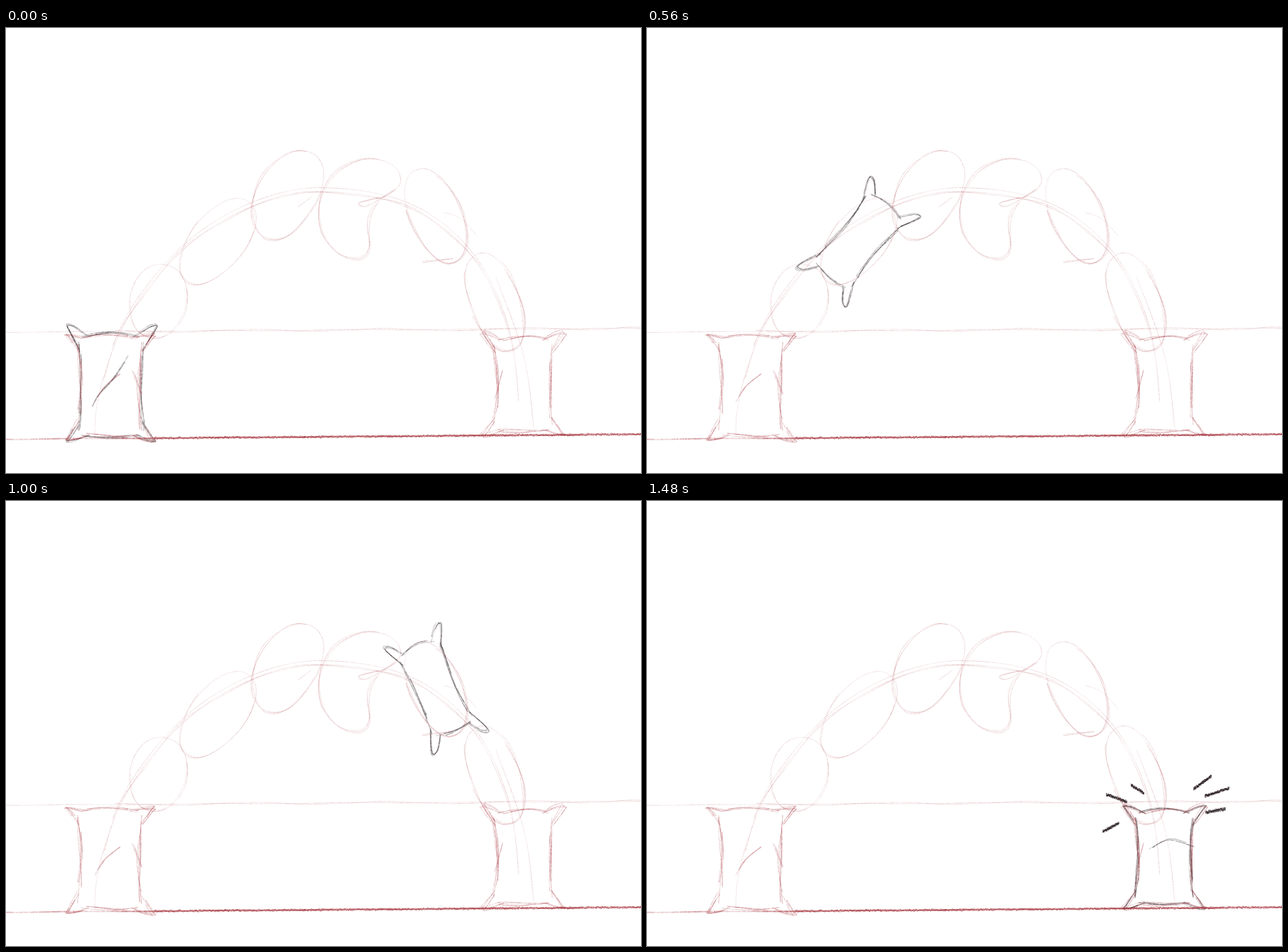
Recreate the animation shown at these times as an HTML page with a canvas. Size 894 by 626 pixels, loop 1600 ms.

```html
<!DOCTYPE html>
<html lang="en">
<head>
<meta charset="utf-8">
<title>Flour sack jump</title>
<style>
html, body { margin: 0; width: 100%; height: 100%; overflow: hidden; background: #fff; }
canvas { display: block; width: 894px; height: 626px; }
</style>
</head>
<body>
<canvas id="stage" width="894" height="626"></canvas>
<script>
const W = 894, H = 626, LOOP = 1600;
const RED = '168,58,66', INK = '40,28,32';

let seed = 1;
const rnd = (lo = 0, hi = 1) => {
  seed = (seed * 1664525 + 1013904223) >>> 0;
  return lo + (hi - lo) * seed / 4294967296;
};
const range = (n, f) => Array.from({ length: n + 1 }, (_, i) => f(i / n));

function sheet(paint, s) {
  const c = document.createElement('canvas');
  c.width = W;
  c.height = H;
  seed = s;
  paint(c.getContext('2d'));
  return c;
}

// Catmull-Rom samples, about two pixels apart
function curve(pts) {
  const at = i => pts[Math.max(0, Math.min(pts.length - 1, i))];
  const out = [pts[0]];
  for (let i = 0; i < pts.length - 1; i++) {
    const q = [-1, 0, 1, 2].map(k => at(i + k));
    const n = Math.ceil(Math.hypot(q[2][0] - q[1][0], q[2][1] - q[1][1]) / 2) || 1;
    for (let j = 1; j <= n; j++) {
      const t = j / n;
      out.push([0, 1].map(k => {
        const [a, b, c, d] = q.map(p => p[k]);
        return b + t / 2 * (c - a + t * (2 * a - 5 * b + 4 * c - d + t * (3 * (b - c) + d - a)));
      }));
    }
  }
  return out;
}

// Pencil: overlapping partial passes with wobble and uneven pressure
const pencil = (g, color, alpha, wobble = 1.8, width = 1.1) => (passes, ...points) => {
  const pts = curve(points);
  g.lineWidth = width;
  for (let p = 0; p < passes; p++) {
    const ax = rnd(0, 7), ay = rnd(0, 7), amp = p ? wobble : 0.4;
    const spot = i => [pts[i][0] + amp * Math.sin(ax + i / 11), pts[i][1] + amp * Math.sin(ay + i / 14)];
    const first = p ? Math.floor(pts.length * rnd(0, 0.25)) : 0;
    const last = p ? pts.length * rnd(0.75, 1) : pts.length;
    for (let i = first + 1; i < last; i++) {
      g.strokeStyle = `rgba(${color},${alpha * (0.75 + 0.25 * Math.sin(ax + i / 9)) * rnd(0.4, 1)})`;
      g.beginPath();
      g.moveTo(...spot(i - 1));
      g.lineTo(...spot(i));
      g.stroke();
    }
  }
};

// Grainy crayon bar
function crayon(g, color, thick, x1, y1, x2, y2) {
  const n = Math.hypot(x2 - x1, y2 - y1) * thick * 1.7;
  for (let i = 0; i < n; i++) {
    const t = i / n, off = (rnd() + rnd() - 1) * thick;
    g.fillStyle = `rgba(${color},${rnd(0.1, 0.7)})`;
    g.fillRect(x1 + (x2 - x1) * t, y1 + (y2 - y1) * t + off - 0.6, 1.3, 1.2);
  }
}

const pose = (x, y, w, h, turn = 0, bend = 0, more) =>
  ({ x, y, w, h, turn, bend, spread: 12, up: 20, down: 22, ...more });

// Maps body coordinates onto the stage: bend along an arc, then turn
const placer = ({ x, y, h, turn, bend }) => (u, v) => {
  const k = (bend || 0.001) / (h / 2), r = 1 / k, a = turn * Math.PI / 180;
  const px = r - (r - u) * Math.cos(k * v), py = (r - u) * Math.sin(k * v);
  return [x + px * Math.cos(a) - py * Math.sin(a), y + px * Math.sin(a) + py * Math.cos(a)];
};

function sack(p, s, heavy = 4) {
  const put = placer(s), a = s.w / 2, b = s.h / 2, ear = s.w * 0.17;
  for (const side of [-1, 1]) {
    p(heavy, ...range(4, t => put(side * (a - 4 * Math.sin(Math.PI * t)), (2 * t - 1) * (b - 6))));
    const rise = side < 0 ? 6 : 3;
    p(3, ...range(4, t => put((2 * t - 1) * (a - 5), side * (b + rise * Math.sin(Math.PI * t)))));
    for (const end of [-1, 1]) {
      const tip = end < 0 ? s.up : s.down;
      p(3,
        put(side * (a - 2), end * (b - ear * 1.3)),
        put(side * (a + s.spread * 0.8), end * (b + tip * 0.5)),
        put(side * (a + s.spread), end * (b + tip)),
        put(side * (a + s.spread * 0.5 - 3), end * (b + tip * 0.85)),
        put(side * (a - ear), end * b));
    }
  }
}

// Loose oval around a body
function oval(p, s, passes) {
  const put = placer(s);
  const soften = c => Math.sign(c) * Math.abs(c) ** 0.9;
  p(passes, ...range(20, t => {
    const a = t * 2 * Math.PI - 2;
    return put(s.w * 0.58 * soften(Math.cos(a)), s.h * 0.57 * Math.sin(a));
  }));
}

// Path of the jump: half of a superellipse on each side of the top
const arc = (x, top) => {
  const right = x > 440, u = Math.min(1, Math.abs(x - 440) / (right ? 283 : 315));
  const e = right ? 2.4 : 1.85;
  return [x, top + 341 * (1 - (1 - u ** e) ** (1 / e))];
};

const flight = [
  pose(214, 384, 68, 92, 14),
  pose(298, 300, 65, 124, 39),
  pose(395, 234, 72, 118, 30, 0.45),
  pose(481, 243, 64, 150, 25, 1.45, { spread: 0, up: 24, down: 10 }),
  pose(605, 264, 62, 123, -24),
  pose(688, 385, 60, 126, -20)
];
const grounded = { spread: 17, up: 11, down: 8 };
const start = pose(146, 504, 90, 136, 0, 0, { ...grounded, up: 4 });
const landed = pose(728, 502, 82, 126, 0, 0, grounded);

function guides(g) {
  const faint = pencil(g, RED, 0.3, 1.8, 0.9);
  const firm = pencil(g, RED, 0.52, 2.6);

  faint(2, [0, 428], [447, 425], [894, 422.5]);
  pencil(g, RED, 0.6, 0.6, 1.8)(2, [0, 578.5], [210, 577], [560, 574], [894, 571.5]);
  crayon(g, RED, 1.9, 208, 577, 894, 571.5);

  // dense sampling near the steep ends
  const along = (x1, x2, top) => range(40, t => arc(x1 + (x2 - x1) * (1 - Math.cos(Math.PI * t)) / 2, top));
  faint(2, ...along(125, 722, 231));
  faint(1, ...along(150, 715, 225));
  faint(1, [690, 350], [731, 470], [743, 568]);

  flight.forEach((s, i) => oval(faint, s, i < 2 ? 2 : i < 4 ? 3 : 4));
  faint(1, [430, 238], [411, 252]);
  faint(2, [548, 226], [510, 249], [498, 245], [535, 237]);
  faint(1, [617, 260], [640, 268], [663, 291]);
  faint(2, [586, 330], [630, 324]);

  sack(firm, start);
  firm(2, [125, 527], [138, 505], [161, 486]);
  firm(2, [180, 484], [191, 515]);
  sack(firm, landed);
  firm(1, [699, 480], [688, 522]);
}

const plain = s => p => sack(p, s);

function stand(p) {
  sack(p, pose(148, 504, 92, 138, 0, 0, { ...grounded, up: 18 }), 3);
  p(2, [122, 533], [131, 515], [150, 493], [172, 461]);
}

function squash(p) {
  sack(p, pose(736, 528, 86, 74, 0, 0, { spread: 23, up: 0, down: 6 }), 3);
  p(4, [680, 504], [693, 478], [735, 459], [780, 470], [800, 488]);
  p(3, [680, 504], [735, 490], [800, 488]);
  p(1, [692, 490], [735, 475], [788, 482]);
  p(1, [703, 515], [725, 505], [760, 503]);
}

function settle(p, g) {
  sack(p, landed, 5);
  p(2, [707, 490], [735, 477], [770, 486]);
  const dash = (...ends) => [0, 1].forEach(() => crayon(g, INK, 2.6, ...ends));
  dash(769, 405, 794, 387);
  dash(785, 415, 819, 404);
  dash(786, 438, 814, 433);
  dash(646, 413, 675, 423);
  dash(681, 400, 699, 411);
  dash(641, 465, 664, 453);
}

const [rise, climb, peak, tuck, descend, fall] = flight.map(plain);
const crouch = plain(pose(158, 534, 96, 84, 12, 0.3, grounded));
const launch = plain(pose(182, 458, 76, 106, 15, 0, { spread: 8, up: 17, down: 14 }));
const rebound = plain(pose(727, 491, 82, 148, 0, 0, grounded));

const steps = [
  [0, stand], [160, crouch], [320, launch], [440, rise], [560, climb], [680, peak],
  [840, tuck], [1000, descend], [1120, fall], [1200, squash], [1360, rebound], [1480, settle]
].map(([at, draw], i) => ({ at, art: sheet(g => draw(pencil(g, INK, 0.62), g), 40 + i) }));

const backdrop = sheet(guides, 7);
const stage = document.getElementById('stage').getContext('2d');
let shown;

function show() {
  const t = performance.now() % LOOP;
  const step = steps.filter(s => s.at <= t).pop();
  if (step !== shown) {
    shown = step;
    stage.fillStyle = '#fff';
    stage.fillRect(0, 0, W, H);
    stage.drawImage(step.art, 0, 0);
    stage.drawImage(backdrop, 0, 0);
  }
  requestAnimationFrame(show);
}
show();
</script>
</body>
</html>
```
